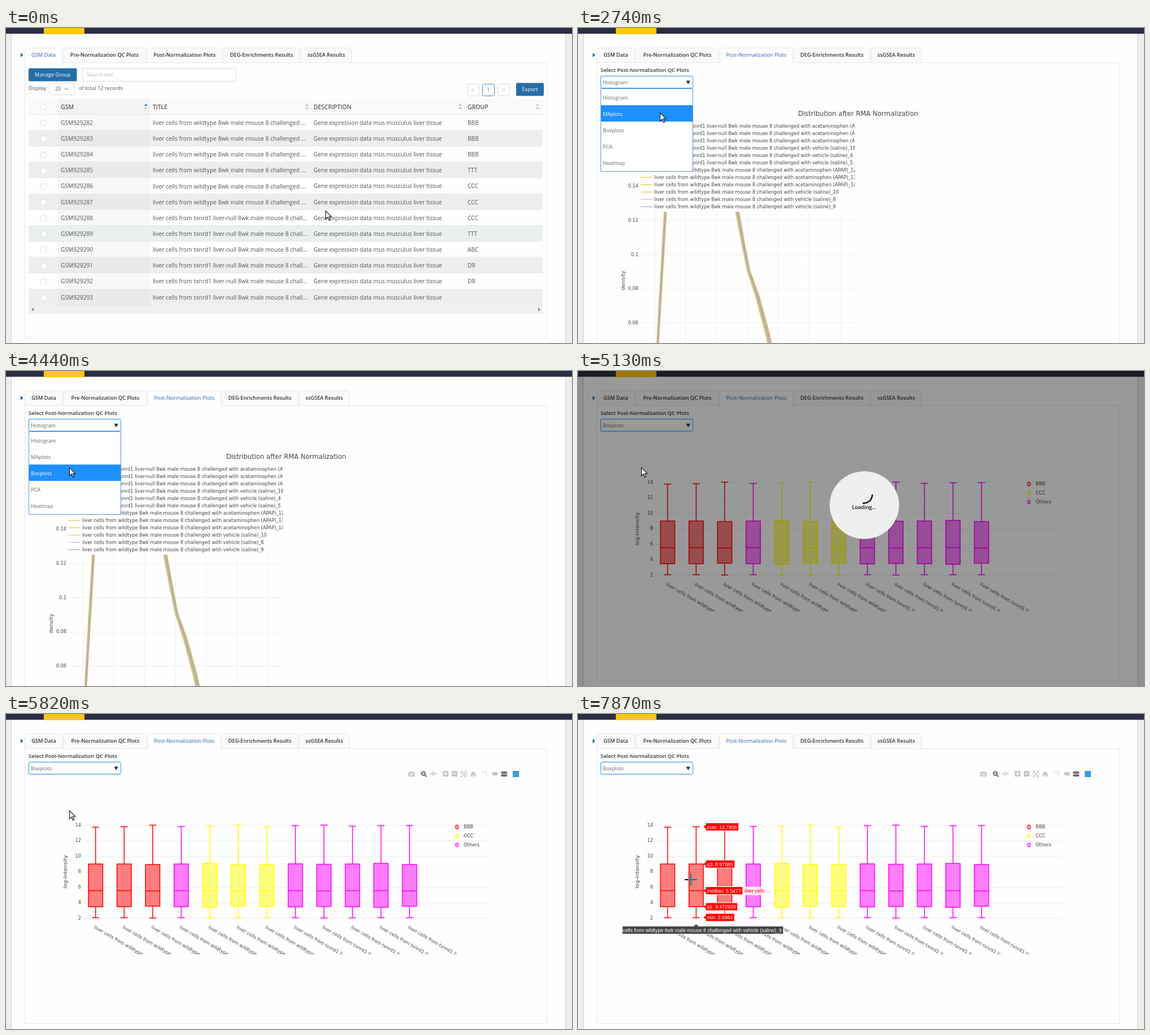
Animation, 1003 px wide and 559 px high, one loop 8000 ms. Source, as an HTML page with a canvas:

```html
<!DOCTYPE html>
<html lang="en">
<head>
<meta charset="utf-8">
<title>Normalization plots</title>
<style>
html, body { margin: 0; width: 100%; height: 100%; overflow: hidden; }
canvas { display: block; }
</style>
</head>
<body>
<canvas id="stage" width="1003" height="559"></canvas>
<script>
const ctx = document.getElementById('stage').getContext('2d');
const LOOP = 8000;
const UI = '"Open Sans", "Noto Sans", sans-serif';
const PLOT = '"DejaVu Sans", sans-serif';
const TIP = '"Liberation Sans", Arial, sans-serif';
const PAPER = '#fefefe', BLUE = '#2d62a8', BUTTON = '#276ea8', FOCUS = '#40a0f5';

// [start ms, value...]: each step holds until the next one
const CURSOR = [
  [0, 'arrow', 566, 324], [330, 'hand', 363, 50], [680, 'hand', 344, 43],
  [2030, 'hand', 150, 102], [2740, 'arrow', 145, 150], [3090, 'arrow', 133, 190],
  [3410, 'arrow', 133, 167], [3740, 'arrow', 115, 207], [4090, 'arrow', 115, 214],
  [4440, 'arrow', 112, 171], [6170, 'arrow', 90, 199], [6490, 'arrow', 94, 245],
  [6840, 'cross', 135, 287], [7190, 'cross', 150, 297], [7540, 'cross', 181, 298],
  [7870, 'cross', 200, 294]
];
const OPTION = [[0, -1], [2390, 0], [2740, 1], [3090, 2], [3740, 3], [4440, 2], [5130, -1]];
const stepAt = (steps, t) => steps.filter(s => s[0] <= t).pop();

// y is the middle of the capital letters
function text(str, x, y, size = 9.2, color = '#555', { font = UI, weight = 400, align = 'left' } = {}) {
  ctx.font = `${weight} ${size}px ${font}`;
  ctx.fillStyle = color;
  ctx.textAlign = align;
  ctx.fillText(str, x, y + size * 0.36);
}
const plotText = (str, x, y, align = 'left', size = 8.25) =>
  text(str, x, y, size, '#444', { font: PLOT, align });

function box(x, y, w, h, fill, stroke, radius = 0) {
  ctx.beginPath();
  ctx.roundRect(stroke ? x + 0.5 : x, stroke ? y + 0.5 : y, stroke ? w - 1 : w, stroke ? h - 1 : h, radius);
  if (fill) { ctx.fillStyle = fill; ctx.fill(); }
  if (stroke) { ctx.strokeStyle = stroke; ctx.lineWidth = 1; ctx.stroke(); }
}
function path(points, color, width = 1) {
  ctx.beginPath();
  points.forEach(([x, y]) => ctx.lineTo(x, y));
  ctx.strokeStyle = color;
  ctx.lineWidth = width;
  ctx.stroke();
}
function shape(points, fill) {
  ctx.beginPath();
  points.forEach(([x, y]) => ctx.lineTo(x, y));
  ctx.closePath();
  ctx.fillStyle = fill;
  ctx.fill();
}
function clipped(x, y, w, h, draw) {
  ctx.save();
  ctx.beginPath();
  ctx.rect(x, y, w, h);
  ctx.clip();
  draw();
  ctx.restore();
}
function rotated(x, y, angle, draw) {
  ctx.save();
  ctx.translate(x, y);
  ctx.rotate(angle);
  draw();
  ctx.restore();
}

function page(active, hovered, panelBottom) {
  box(0, 0, 1003, 559, '#eeeeee');
  box(9, 9, 983, 560, PAPER, '#d2d2d2');
  box(0, 0, 1003, 10.3, '#2b2e43');
  box(67, 0, 72, 11, '#ffc610');
  shape([[26, 44], [30.5, 48], [26, 52]], '#1f6aa5');
  box(33, 61, 927, panelBottom - 61, null, '#e6e6e6');
  const names = ['GSM Data', 'Pre-Normalization QC Plots', 'Post-Normalization Plots',
    'DEG-Enrichments Results', 'ssGSEA Results'];
  const edges = active ? [33, 102, 251, 382, 519, 610] : [33, 101, 249, 385, 522, 614];
  names.forEach((name, i) => {
    const x = edges[i], w = edges[i + 1] - x - 1, on = i === active;
    box(x, 35, w, 27, on ? PAPER : '#fafafa', '#e6e6e6', [3, 3, 0, 0]);
    if (on) box(x + 1, 60, w - 2, 3, PAPER);
    text(name, x + w / 2, 48, on ? 9.3 : 9.2, on || i === hovered ? BLUE : '#333',
      { weight: on ? 400 : 600, align: 'center' });
  });
}

function sorter(x, color) {
  shape([[x - 3, 138], [x, 134.5], [x + 3, 138]], color);
  shape([[x - 3, 141], [x, 144.5], [x + 3, 141]], '#bfbfbf');
}
const checkbox = y => box(61, y - 5, 11, 11, '#fff', '#dcdcdc', 2);

function pager(x, label, border, color) {
  box(x, 99, 22, 22, '#fff', border, 3);
  text(label, x + 11, 110, 9.2, color, { align: 'center' });
}
function chevron(x, y, dx, dy, color) {
  path(dx ? [[x - dx, y - 3], [x + dx, y], [x - dx, y + 3]] : [[x - 3, y - dy], [x, y + dy], [x + 3, y - dy]], color);
}
function button(label, x, y, w) {
  box(x, y, w, 23, BUTTON, null, 2);
  text(label, x + w / 2, y + 11.5, 9.2, '#fff', { align: 'center', weight: 500 });
}

function table(hoverRow) {
  button('Manage Group', 40, 71.5, 85.5);
  box(135, 71, 273, 24, '#fff', '#d9d9d9', 3);
  text('Search text', 143, 83, 9.1, '#b5b5b5');
  text('Display', 40, 107);
  box(76, 97, 46, 22, '#fff', '#d9d9d9', 3);
  text('25', 87, 108);
  chevron(107, 108, 0, 2, '#777');
  text('of total 12 records', 129, 107);
  pager(817, '', '#d9d9d9');
  pager(844, '1', '#3d88c4', '#2a78b8');
  pager(871, '', '#d9d9d9');
  chevron(827.5, 110, -2, 0, '#bbb');
  chevron(882, 110, 2, 0, '#bbb');
  button('Export', 904, 97.5, 49);

  box(40, 126, 911, 28, '#fafafa');
  box(92, 126, 164, 28, '#f3f3f3');
  box(40, 153, 911, 1, '#e6e6e6');
  checkbox(140);
  [['GSM', 97], ['TITLE', 260], ['DESCRIPTION', 545], ['GROUP', 818]].forEach(([name, x]) =>
    text(name, x, 140, 10.6, '#2b2b2b', { weight: 500 }));
  sorter(248, '#2a78b8');
  [533, 805, 942].forEach(x => sorter(x, '#bfbfbf'));

  const groups = ['BBB', 'BBB', 'BBB', 'TTT', 'CCC', 'CCC', 'CCC', 'TTT', 'ABC', 'DR', 'DR', ''];
  groups.forEach((group, i) => {
    const top = 154 + i * 28.15, y = top + 14.2, odd = i % 2;
    box(40, top, 911, 28.15, odd ? '#eeeeee' : PAPER);
    box(92, top, 164, 28.15, odd ? '#eaeaea' : '#f8f8f8');
    if (i === hoverRow) box(40, top, 911, 28.15, '#ebefef');
    box(40, Math.round(top + 27), 911, 1, '#e8e8e8');
    checkbox(Math.round(y));
    text(`GSM9292${82 + i}`, 97, y, 10.2);
    text(i < 6 ? 'liver cells from wildtype 8wk male mouse 8 challenged ...'
      : 'liver cells from txnrd1 liver-null 8wk male mouse 8 chall...', 260, y, 10.32);
    text('Gene expression data mus musculus liver tissue', 545, y, 10.2);
    text(group, 818, y, 10.2);
  });
  box(40, 492, 911, 15, '#f0f0f0');
  shape([[49, 496], [45, 499.5], [49, 503]], '#888');
  shape([[943, 496], [947, 499.5], [943, 503]], '#888');
}

function select(value, focused, hovered) {
  text('Select Post-Normalization QC Plots', 40, 75, 9.35, '#333', { weight: 600 });
  if (focused) box(38.5, 84, 166, 25, '#d3e9fd', null, 4);
  box(40, 85, 164, 22, '#fff', focused || hovered ? FOCUS : '#d0d0d0', 3);
  text(value, 44, 97, 9.1, '#666');
  shape([[191.5, 93.5], [199, 93.5], [195.2, 100]], '#333');
}
function dropdown(chosen) {
  box(40, 107, 164, 148, '#fff', '#5b8fd6');
  ['Histogram', 'MAplots', 'Boxplots', 'PCA', 'Heatmap'].forEach((name, i) => {
    const y = 108 + i * 29;
    if (i === chosen) box(41, y, 162, 29, '#1e90ff');
    text(name, 44, y + 15.5, 9.2, i === chosen ? '#fff' : '#666');
  });
}

function histogram() {
  plotText('Distribution after RMA Normalization', 496.3, 151.5, 'center', 11.6);
  const grid = '#eeeeee';
  for (let i = 0; i < 7; i++) box(Math.round(135.5 + i * 54.7), 326, 1, 240, grid);
  for (let i = 0; i < 6; i++) {
    const y = 219.5 + i * 60.75;
    if (i > 1) box(111, Math.round(y), 380, 1, grid);
    plotText(String((16 - 2 * i) / 100), 107, y, 'right');
  }
  rotated(79.5, 448, -Math.PI / 2, () => plotText('density', 0, 0, 'center', 9.5));

  const colors = ['#a0dcbd', '#e0bd90', '#e5b870', '#b5b0d0', '#ccb0d8', '#e6acb0',
    '#d0b650', '#e8d670', '#ecd96f', '#f4ce92', '#e6cbc0', '#c2bcc4'];
  const kinds = ['acetaminophen (APAP)_', 'vehicle (saline)_'];
  const numbers = [1, 2, 3, 16, 4, 5, 12, 13, 14, 10, 8, 9];
  clipped(79, 160, 412, 399, () => numbers.forEach((n, i) => {
    const strain = i < 6 ? 'txnrd1 liver-null' : 'wildtype', y = 174 + i * 13;
    box(111, y - 0.6, 21, 1.6, colors[i]);
    plotText(`liver cells from ${strain} 8wk male mouse 8 challenged with ${kinds[i % 6 < 3 ? 0 : 1]}${n}`, 135, y);
  }));

  const curve = (offset, color, width) => {
    path([[141 + offset * 0.5, 562], [148 + offset * 0.6, 440], [155 + offset * 0.65, 320]], color, width);
    path([[281 + offset, 320], [291.5 + offset * 0.9, 377], [302 + offset * 0.8, 430], [317.5 + offset * 1.1, 475],
      [335 + offset * 1.2, 540], [340 + offset * 1.2, 562]], color, width);
  };
  clipped(111, 326, 380, 233, () => {
    curve(-2.7, '#e8cf62', 2);
    curve(3, '#e6ca55', 2);
    [['#c9bd9a', -1.7], ['#b5c9b2', -0.9], ['#b9a8b6', 0], ['#c4a9a4', 0.9], ['#b3aac0', 1.7]]
      .forEach(([color, offset]) => curve(offset, color, 1.6));
  });
}

const RED = '255,0,0', YELLOW = '255,255,0', MAGENTA = '255,0,255';
const boxX = i => 158.8 + i * 50.57;
const valueY = v => 197 + (14 - v) * 13.75;
const MAXIMA = [13.73, 13.78, 13.98, 13.81, 13.83, 13.98, 13.73, 13.91, 13.99, 13.83, 13.9, 13.93];
const WOBBLE = [0, 0, -1, 0, 1, -1, -1, 0.3, -0.4, 0, 1, -1];

function boxplots() {
  for (let v = 2; v <= 14; v += 2) {
    box(137, Math.round(valueY(v)), 722, 1, '#eeeeee');
    plotText(String(v), 133, valueY(v), 'right');
  }
  rotated(104.5, 280, -Math.PI / 2, () => plotText('log-intensity', 0, 0, 'center', 9.5));
  MAXIMA.forEach((max, i) => {
    const x = boxX(i), wobble = WOBBLE[i];
    const rgb = i < 3 ? RED : i > 3 && i < 7 ? YELLOW : MAGENTA;
    const color = `rgb(${rgb})`;
    const top = valueY(max), q3 = 266.2 - wobble, mid = 313.5 + (i % 3 === 2 ? 0.6 : 0);
    const q1 = 342 + wobble, low = 361.5 + (i % 6 === 2 ? 0.5 : 0);
    ctx.fillStyle = `rgba(${rgb},.5)`;
    ctx.fillRect(x - 12.7, q3, 25.4, q1 - q3);
    ctx.strokeStyle = color;
    ctx.lineWidth = 1.5;
    ctx.strokeRect(x - 12.7, q3, 25.4, q1 - q3);
    path([[x - 12.7, mid], [x + 12.7, mid]], color, 1.5);
    [[top, q3], [low, q1]].forEach(([end, start]) => {
      path([[x, start], [x, end]], color, 1.5);
      path([[x - 6.4, end], [x + 6.4, end]], color, 1.5);
    });
  });
  clipped(79, 360, 800, 66.5, () => MAXIMA.forEach((_, i) =>
    rotated(boxX(i) - 2, 377.5, Math.PI / 6, () =>
      plotText(`liver cells from ${i < 7 ? 'wildtype' : 'txnrd1 liver-null'}`, 0, 0))));
  [['BBB', RED], ['CCC', YELLOW], ['Others', MAGENTA]].forEach(([name, rgb], i) => {
    const y = 200.5 + i * 15.9;
    ctx.beginPath();
    ctx.roundRect(796.8, y - 3.3, 4.6, 6.6, 1.5);
    ctx.fillStyle = `rgba(${rgb},.3)`;
    ctx.fill();
    ctx.strokeStyle = `rgb(${rgb})`;
    ctx.lineWidth = 1.2;
    ctx.stroke();
    plotText(name, 811, y);
  });
}

function modebar() {
  const pale = '#c8c4c8', dark = '#756a75', y = 106;
  box(713, 103, 11, 8, pale, null, 1);
  box(716, 102, 5, 2, pale);
  const ring = (x, cy, r, color, width) => {
    ctx.beginPath();
    ctx.arc(x, cy, r, 0, 7);
    ctx.strokeStyle = color;
    ctx.lineWidth = width;
    ctx.stroke();
  };
  ring(718.5, 107, 2, PAPER, 1.2);
  ring(739.5, 105.5, 3.3, dark, 2);
  path([[742, 108], [745.5, 111.5]], dark, 2);
  path([[737.5, 105.5], [741.5, 105.5]], dark);
  path([[752, y], [762, y]], pale, 1.5);
  path([[757, 101], [757, 111]], pale, 1.5);
  [[752.5, -1], [761.5, 1]].forEach(([x, d]) => shape([[x, 104], [x + d * 2, y], [x, 108]], pale));
  [774, 790].forEach(x => {
    box(x, 101, 10, 10, pale, null, 1);
    box(x + 2, 105.3, 6, 1.5, PAPER);
  });
  box(778.3, 103, 1.5, 6, PAPER);
  path([[807, 102], [816, 111]], pale, 1.5);
  path([[816, 102], [807, 111]], pale, 1.5);
  ctx.setLineDash([3, 4]);
  ctx.strokeRect(806.5, 101.5, 10, 10);
  ctx.setLineDash([]);
  shape([[822.5, 107], [828, 101.5], [833.5, 107], [832, 107], [832, 111], [829, 111], [829, 108],
    [827, 108], [827, 111], [824, 111], [824, 107]], pale);
  ctx.setLineDash([2, 1.5]);
  path([[844, 103], [851, 103], [851, 111]], pale, 1.5);
  ctx.setLineDash([]);
  shape([[860.5, y], [864, 103], [871, 103], [871, 109], [864, 109]], pale);
  [102, 107].forEach(top => shape([[876.5, top + 2], [878.5, top], [888, top], [888, top + 4], [878.5, top + 4]], dark));
  box(898, 101, 11, 11, '#3a9be0');
}

function tooltip(i) {
  const x = boxX(i) + 13;
  const values = i ? ['13.7805', '8.97885', '5.5477', '3.472925', '2.0864']
    : ['13.7354', '8.98231', '5.5735', '3.477150', '2.0917'];
  const style = { font: TIP };
  ['max', 'q3', 'median', 'q1', 'min'].forEach((name, k) => {
    const label = `${name}: ${values[k]}`, y = valueY(+values[k]) + 0.2;
    ctx.font = `8.8px ${TIP}`;
    const w = ctx.measureText(label).width + 4;
    box(x + 3.5, y - 7.5, w + 2.5, 15, '#fff');
    box(x + 4.5, y - 6.5, w, 13, 'red');
    shape([[x, y], [x + 5, y - 4], [x + 5, y + 4]], 'red');
    text(label, x + 6, y + 0.3, 8.8, '#fff', style);
    if (name === 'median') {
      box(x + w + 6, y - 7, 50, 15, 'rgba(255,255,255,.82)');
      text('liver cells ...', x + w + 8, y + 0.3, 8.8, 'red', style);
    }
  });
  clipped(79, 370, 780, 22, () => {
    const c = boxX(i);
    box(c - 155, 376, 310, 15, '#fff');
    box(c - 154, 377, 308, 13, '#444');
    shape([[c - 5, 377.5], [c, 373], [c + 5, 377.5]], '#444');
    text(`liver cells from wildtype 8wk male mouse 8 challenged with vehicle (saline)_${8 + i}`,
      c + 1.5, 383.5, 8.8, '#fff', { font: TIP, align: 'center' });
  });
}

function loading(t) {
  box(0, 0, 1003, 559, 'rgba(0,0,0,.4)');
  ctx.beginPath();
  ctx.ellipse(507.5, 238, 61.5, 60, 0, 0, 7);
  ctx.fillStyle = '#efefef';
  ctx.fill();
  const start = t < 5490 ? 0.05 : 2.4;
  ctx.beginPath();
  ctx.arc(506.5, 219.5, 15, start, start + 1.6);
  ctx.strokeStyle = '#111';
  ctx.lineWidth = 2.6;
  ctx.lineCap = 'round';
  ctx.stroke();
  ctx.lineCap = 'butt';
  text('Loading...', 507, 242, 9.3, '#111', { weight: 600, align: 'center' });
}

const OUTLINES = {
  arrow: 'M.5 .5V15L4 11.8L6.4 17.5L8.6 16.5L6.2 11H10.8Z',
  hand: 'M4.5 13V2Q4.5 .6 5.8 .6Q7.1 .6 7.1 2V8Q9.3 6.8 9.7 8.6Q11.5 7.8 11.9 9.4Q13.5 9 13.5 10.8V15Q13.5 18 11.8 20.9H5Q4 17.5 .8 13.2Q.2 11.5 2 11.3Q3.4 11.6 4.5 13Z'
};
function cursor([, kind, x, y]) {
  ctx.save();
  if (kind === 'cross') {
    ctx.globalCompositeOperation = 'difference';
    ctx.fillStyle = '#fff';
    ctx.fillRect(x - 11, y - 1, 22, 2);
    ctx.fillRect(x - 1, y - 11, 2, 10);
    ctx.fillRect(x - 1, y + 1, 2, 10);
  } else {
    const outline = new Path2D(OUTLINES[kind]);
    ctx.translate(x, y);
    ctx.fillStyle = '#fff';
    ctx.fill(outline);
    ctx.strokeStyle = '#111';
    ctx.lineWidth = 1.1;
    ctx.stroke(outline);
    if (kind === 'hand') [7.1, 9.5, 11.7].forEach(fx => path([[fx, 8], [fx, 11.5]], '#111'));
  }
  ctx.restore();
}

function render(t) {
  if (t < 1350) {
    page(0, t < 680 ? -1 : 2, 550);
    table(t < 330 ? 7 : -1);
  } else if (t < 5130) {
    page(2, -1, 600);
    histogram();
    select('Histogram', t >= 2390, t >= 2030);
    const chosen = stepAt(OPTION, t)[1];
    if (chosen >= 0) dropdown(chosen);
  } else {
    page(2, -1, 550);
    select('Boxplots', true);
    boxplots();
    if (t < 5820) loading(t);
    else modebar();
    if (t >= 6840) tooltip(t < 7870 ? 0 : 1);
  }
  cursor(stepAt(CURSOR, t));
}

function frame() {
  render(performance.now() % LOOP);
  requestAnimationFrame(frame);
}
frame();
</script>
</body>
</html>
```
